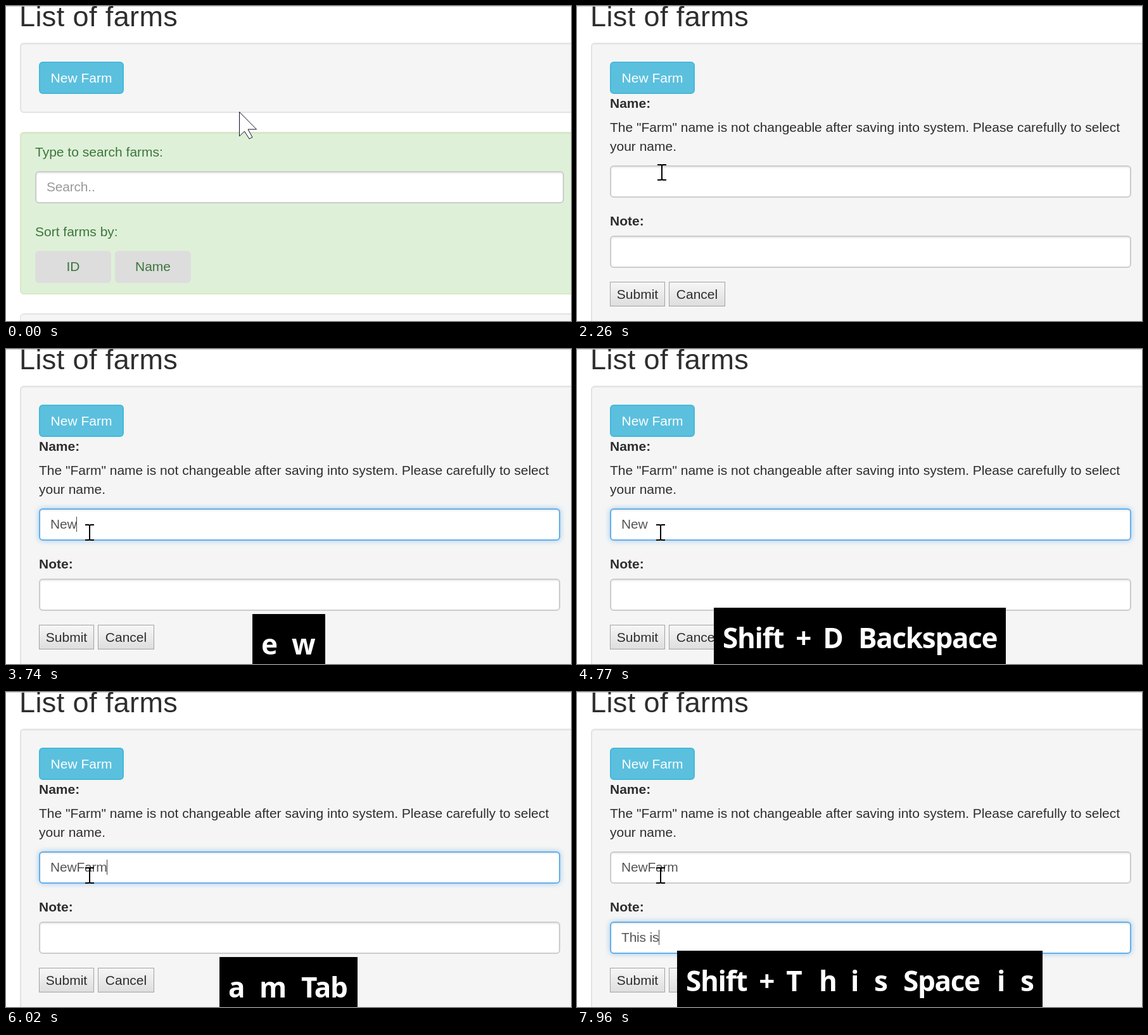
Animation, 892 px wide and 498 px high, one loop 8 s. Source, as an HTML page:

```html
<!DOCTYPE html>
<html lang="en">
<head>
<meta charset="utf-8">
<title>List of farms</title>
<style>
  html, body { margin: 0; width: 100%; height: 100%; overflow: hidden; background: #fff; }
  #stage { position: relative; width: 892px; height: 498px; overflow: hidden;
    font: 21px/30px "Liberation Sans", Arial, sans-serif; color: #2e2e2e; }
  #stage div, #stage svg { position: absolute; box-sizing: border-box; white-space: pre; }
  #stage .line { left: 0; top: 0; width: 892px; height: 1px; background: #ccc; }
  #stage .title { left: 21px; top: -8px; font-size: 45px; line-height: 50px; letter-spacing: .4px; }
  .well { left: 22px; width: 900px; background: #f5f5f5; border: 2px solid #e3e3e3; border-radius: 6px;
    box-shadow: inset 0 1px 1px rgba(0,0,0,.05); }
  .well.green { background: #dff0d8; border-color: #d6e9c6; }
  .green-text { color: #3c763d; }
  .field { height: 51px; padding-left: 16px; line-height: 46px; background: #fff; color: #555;
    border: 2px solid #ccc; border-radius: 6px; letter-spacing: -.2px;
    box-shadow: inset 0 2px 2px rgba(0,0,0,.075); }
  .field i { display: inline-block; width: 1px; height: 24px; margin: 0 -2px 0 -.6px;
    background: #444; vertical-align: -5px; }
  .sort { top: 387px; width: 120px; height: 51px; line-height: 50px; border-radius: 6px;
    background: #ddd; text-align: center; }
  #add { left: 52px; top: 88px; width: 134px; height: 51px; line-height: 47px; color: #fff;
    text-align: center; border: 2px solid; border-radius: 6px; }
  .plain { top: 436px; height: 39px; line-height: 37px; text-align: center; border: 1px solid #a3a3a3;
    background: linear-gradient(#f6f6f6, #dedede); }
  #keys { background: #000; color: #fff; overflow: hidden;
    font: bold 44px/60px "Open Sans", "Noto Sans", sans-serif; letter-spacing: -1.3px; word-spacing: 9px; }
  #keys div { top: 17px; }
</style>
</head>
<body>
<div id="stage">
  <div class="line"></div>
  <div class="title">List of farms</div>
  <div class="well" id="well" style="top:58px"></div>

  <div id="list">
    <div class="well green" style="top:199px;height:257px"></div>
    <div class="green-text" style="left:46px;top:216px">Type to search farms:</div>
    <div class="field" style="left:46px;top:261px;width:835px;color:#999">Search..</div>
    <div class="green-text" style="left:46px;top:342px">Sort farms by:</div>
    <div class="sort green-text" style="left:46px">ID</div>
    <div class="sort green-text" style="left:172px">Name</div>
    <div class="well" style="top:486px;height:60px;border:1px solid #ddd"></div>
  </div>

  <div id="form">
    <b><div style="left:52px;top:139px">Name:</div></b>
    <div style="left:52px;top:177px">The "Farm" name is not changeable after saving into system. Please carefully to select
your name.</div>
    <div class="field" id="name" style="left:52px;top:252px;width:823px"></div>
    <b><div style="left:52px;top:325px">Note:</div></b>
    <div class="field" id="note" style="left:52px;top:363px;width:823px"></div>
    <div class="plain" style="left:52px;width:87px">Submit</div>
    <div class="plain" style="left:145px;width:89px">Cancel</div>
  </div>

  <div id="add">New Farm</div>
  <div id="keys"></div>

  <svg id="cursor" width="60" height="60" style="overflow:visible;left:0;top:0">
    <path id="arrow" d="M.5.5V39l8-8 7.500 12 5-2.500L14 28H27.500Z" fill="#fff" stroke="#112"/>
    <path id="hand" d="M-2 1.500q2-2 4 0V11q3-2 5 1 3-1.500 4.500 1 4-1 5 2V23q-1 4-3 6v4H0v-4l-7-10q-1-4 2-3l3 3Z"
      fill="#fff" stroke="#000" stroke-width="1.5" stroke-linejoin="round"/>
    <path id="beam" d="M-7-12H-2Q0-12 0-10Q0-12 2-12H7M0-11V11M-7 12H-2Q0 12 0 10Q0 12 2 12H7"
      fill="none" stroke="#000" stroke-width="2"/>
  </svg>
</div>

<script>
const LOOP = 8000, NEVER = 9000;
const $ = id => document.getElementById(id);

// [pressed at, label, gone at]
const presses = [
  [3370, 'Shift + N', 3600], [3600, 'e', 4530], [3740, 'w', 4610],
  [4130, 'Shift + D', 5090], [4690, 'Backspace', 5710], [5090, 'Shift + F', 6020],
  [5330, 'a', 6240], [5560, 'm', 6470], [6020, 'Tab', 6940],
  [7110, 'Shift + T', NEVER], [7190, 'h', NEVER], [7270, 'i', NEVER], [7420, 's', NEVER],
  [7570, 'Space', NEVER], [7880, 'i', NEVER], [7960, 's', NEVER]
];
// room each key label takes in the overlay
const pitch = {
  'Shift + N': 215, 'Shift + D': 214, 'Shift + F': 203, 'Shift + T': 210,
  Backspace: 244, Space: 148, Tab: 100, e: 48, w: 64, a: 49, m: 66, h: 50, i: 37, s: 46
};
const nameText = [[3370, 'N'], [3600, 'Ne'], [3740, 'New'], [4130, 'NewD'], [4690, 'New'],
  [5090, 'NewF'], [5330, 'NewFa'], [5480, 'NewFar'], [5560, 'NewFarm']];
const noteText = [[7110, 'T'], [7190, 'Th'], [7270, 'Thi'], [7420, 'This'],
  [7570, 'This '], [7880, 'This i'], [7960, 'This is']];
const nameCaret = [[2510, 3060], [3370, 4690], [5090, 6110]];
const noteCaret = [[6110, 6650], [7110, NEVER]];

// progress 0..1 from start to end in n equal jumps, the first at start
const steps = (t, start, end, n) => t < start ? 0
  : Math.min(1, (Math.floor((t - start) / (end - start) * (n - 1) + 1e-6) + 1) / n);
const smooth = p => p * p * (3 - 2 * p);
const mix = (a, b, p) => a + (b - a) * p;
const within = (t, spans) => spans.some(([a, b]) => t >= a && t < b);
const textAt = (t, list) => list.reduce((s, [at, text]) => t >= at ? text : s, '');

function drawField(id, text, caret, focus) {
  const f = $(id), c = (a, b) => Math.round(mix(a, b, focus));
  f.innerHTML = text + (caret ? '<i></i>' : '');
  f.style.borderColor = `rgb(${c(204, 102)},${c(204, 175)},${c(204, 233)})`;
  f.style.boxShadow = 'inset 0 2px 2px rgba(0,0,0,.075)' +
    (focus ? `, 0 0 9px rgba(102,175,233,${.6 * focus})` : '');
}

function drawKeys(t) {
  const shown = presses.filter(([a, , b]) => t >= a && t < b).map(p => p[1]);
  const box = $('keys');
  box.style.display = shown.length ? '' : 'none';
  let x = 0;
  box.innerHTML = shown.map(k => {
    const cell = `<div style="left:${x + 14}px">${k}</div>`;
    x += pitch[k];
    return cell;
  }).join('');
  const width = x + 3, top = shown.some(k => k.includes('p')) ? 409 : 419;
  Object.assign(box.style, { left: Math.round(446 - width / 2) + 'px', top: top + 'px',
    width: width + 'px', height: 510 - top + 'px' });
}

function drawCursor(t) {
  const toButton = smooth(steps(t, 450, 770, 5));
  const toForm = smooth(steps(t, 1470, 2260, 11));
  const toField = steps(t, 2350, 2430, 2);
  let x = mix(368, 175, toButton), y = mix(167, 118, toButton);
  x = mix(mix(x, 134, toForm), 132, toField);
  y = mix(mix(y, 263, toForm) + 10 * Math.sin(Math.PI * toForm), 290, toField);
  const over = x < 186 && y < 139;
  const kind = over ? 'hand' : t > 1470 && y > 248 ? 'beam' : 'arrow';
  for (const k of ['arrow', 'hand', 'beam']) $(k).style.display = k === kind ? '' : 'none';
  $('cursor').style.transform = `translate(${Math.round(x)}px,${Math.round(y)}px)`;
  return over;
}

function draw(t) {
  const open = t >= 1090;
  $('list').style.display = open ? 'none' : '';
  $('form').style.display = open ? '' : 'none';
  $('well').style.height = open ? '500px' : '111px';

  const over = drawCursor(t), pressed = t >= 940 && t < 1090;
  $('add').style.background = pressed ? '#269abc' : over ? '#31b0d5' : '#5bc0de';
  $('add').style.borderColor = pressed ? '#1b6d85' : over ? '#269abc' : '#46b8da';

  const toName = steps(t, 2510, 2590, 2), toNote = steps(t, 6110, 6240, 3);
  drawField('name', textAt(t, nameText), within(t, nameCaret), toName * (1 - toNote));
  drawField('note', textAt(t, noteText), within(t, noteCaret), toNote);
  drawKeys(t);
}

const start = performance.now();
function tick() {
  draw((performance.now() - start) % LOOP);
  requestAnimationFrame(tick);
}
tick();
</script>
</body>
</html>
```
